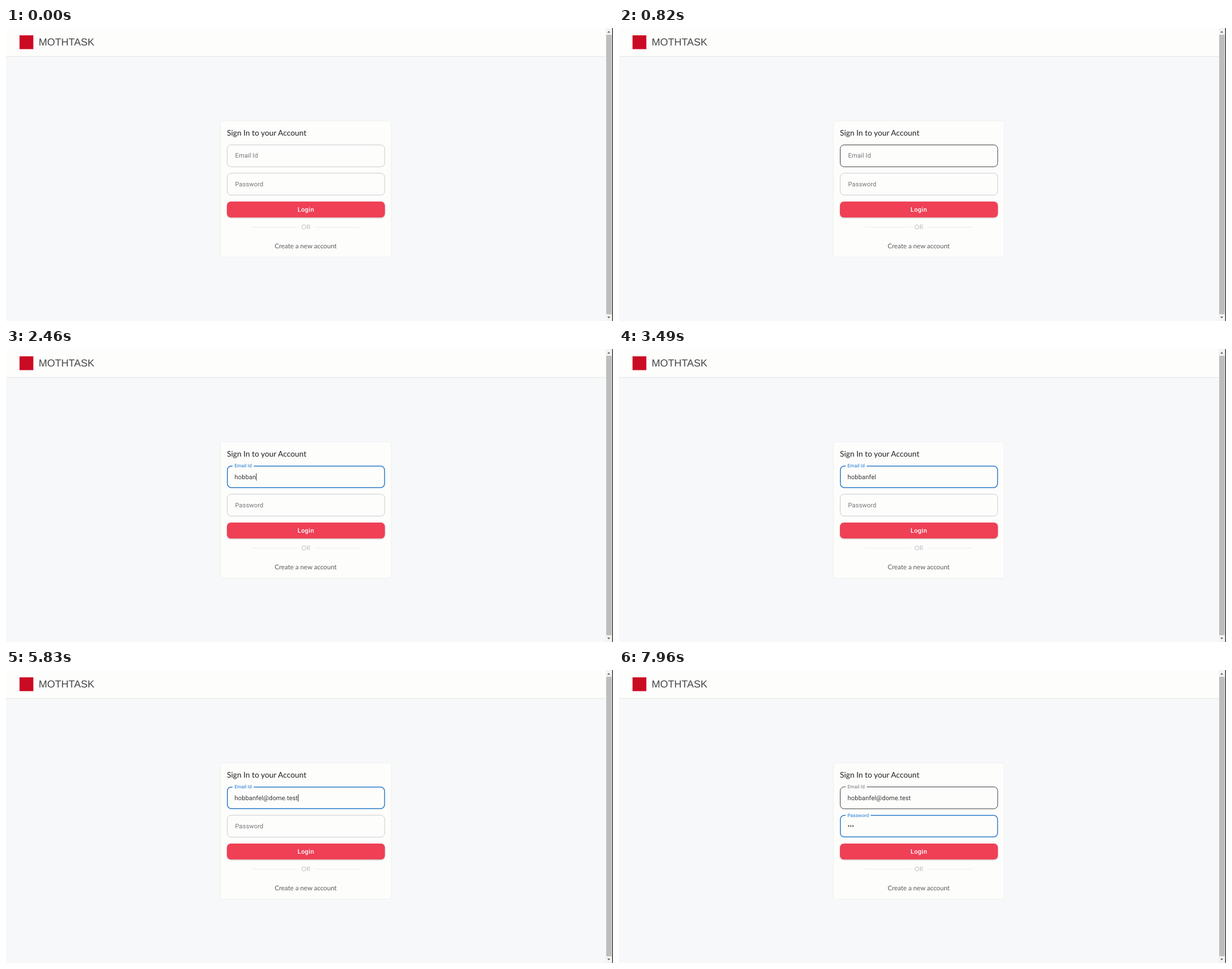
An HTML page for the animation above (7.99 s loop, 1077 by 520 pixels).

```html
<!DOCTYPE html>
<html lang="en">
<head>
<meta charset="utf-8">
<title>Sign in</title>
<style>
  html, body { margin: 0; width: 100%; height: 100%; overflow: hidden; background: #f6f8f9; }
  svg { display: block; width: 1077px; height: 520px; text-rendering: geometricPrecision; }
  .brand { font: 18px "Liberation Sans", Arial, sans-serif; fill: #444448; }
  .soft { font-family: Lato, sans-serif; }
  .ui { font: 11.2px Roboto, sans-serif; letter-spacing: .00938em; }
  .button { font-weight: 500; letter-spacing: .02857em; fill: #fff; }
  .mid { text-anchor: middle; }
  .value { fill: #38383a; }
  .edge { fill: none; }
  .login { filter: drop-shadow(0 1px 1px rgba(0, 0, 0, .24)); }
</style>
</head>
<body>
<svg viewBox="0 0 1077 520">
  <rect width="1077" height="520" fill="#f6f8f9"/>
  <rect width="1064" height="50" fill="#fdfdfc"/>
  <rect y="50" width="1064" height="1" fill="#e3e5e3"/>
  <rect x="24" y="13" width="24.5" height="24.5" fill="#cb0a24"/>
  <text class="brand" x="58" y="31.4">MOTHTASK</text>

  <g id="scrollbar">
    <rect x="1064" width="12" height="520" fill="#f3f3f2"/>
    <rect x="1065" y="12" width="9.5" height="496" fill="#bdbdbd"/>
    <path d="M1066.8 8.2h5.4l-2.7-3zM1066.8 512.2h5.4l-2.7 3z" fill="#606060"/>
    <rect x="1075.6" width="1.4" height="520" fill="#303030"/>
  </g>

  <rect x="380.5" y="165" width="303" height="241.7" rx="3" fill="#fdfdfc" stroke="#eef0f1"/>
  <text class="soft" x="392" y="191.3" font-size="13.85" fill="#222224">Sign In to your Account</text>

  <g id="fields"></g>

  <rect class="login" x="392" y="308" width="280.3" height="28.3" rx="7" fill="#ef4056"/>
  <text class="ui button mid" x="532" y="325.8">Login</text>
  <path d="M437 353.5h80M547 353.5h80" stroke="#ececf3"/>
  <text class="soft mid" x="532" y="357.4" font-size="11.2" fill="#c0c0c3">OR</text>
  <text class="soft mid" x="531.7" y="391" font-size="11.6" fill="#5a5a5d">Create a new account</text>
</svg>

<script>
  const LOOP = 7990;
  const HOVER = 600, FOCUS = 1100, TAB = 6300;
  const ADDRESS = "hobbanfel@dome.test";
  const ADDRESS_KEYS = [1500, 1690, 1850, 2040, 2200, 2390, 2560, 2700, 2850, 3900,
                        4130, 4330, 4510, 4700, 4890, 5130, 5330, 5490, 5660];
  const SECRET_KEYS = [7000, 7200, 7400];
  const BLUE = [25, 118, 210], GREY = [118, 118, 120];

  const clamp = v => Math.min(1, Math.max(0, v));
  const easeOut = p => 1 - (1 - clamp(p)) ** 3;
  const mix = (a, b, p) => a + (b - a) * p;
  const mixColor = (a, b, p) => `rgb(${a.map((v, i) => Math.round(mix(v, b[i], p)))})`;

  function add(parent, tag, attrs) {
    const el = document.createElementNS("http://www.w3.org/2000/svg", tag);
    for (const key in attrs) el.setAttribute(key, attrs[key]);
    return parent.appendChild(el);
  }

  // Outlined text field whose label floats into a notch in the border.
  function makeField(dy, name, notch, text, keys, start, end) {
    const g = add(document.getElementById("fields"), "g", { transform: `translate(0 ${dy})` });
    const edge = add(g, "path", { class: "edge" });
    const label = add(g, "text", { class: "ui" });
    label.textContent = name;
    const value = add(g, "text", { class: "ui value", x: 405.6, y: 230.8 });
    const caret = add(g, "rect", { y: 220.6, width: .9, height: 13, fill: "#222" });
    return { edge, label, value, caret, notch, text, keys, start, end };
  }

  function outline(gap, inset) {
    const l = 392.5 + inset, r = 671.9 - inset, t = 207.5 + inset, b = 246.3 - inset, c = 7;
    return `M${402 + gap} ${t}H${r - c}a${c} ${c} 0 0 1 ${c} ${c}V${b - c}a${c} ${c} 0 0 1 ${-c} ${c}` +
      `H${l + c}a${c} ${c} 0 0 1 ${-c} ${-c}V${t + c}a${c} ${c} 0 0 1 ${c} ${-c}H402`;
  }

  function drawField(f, t, hovered) {
    const focused = t >= f.start && t < f.end;
    const float = easeOut((t - f.start) / 200);
    const gap = f.notch * easeOut((t - f.start - 50) / 100);
    const tint = float * (1 - easeOut((t - f.end) / 200));
    const typed = f.keys.filter(k => k <= t);

    f.edge.setAttribute("d", outline(gap, focused ? .25 : 0));
    f.edge.setAttribute("stroke", focused ? "#2b7bc8" : hovered ? "#3c3c40" : "#cbcbcd");
    f.edge.setAttribute("stroke-width", focused ? 1.5 : 1);

    f.label.setAttribute("transform",
      `translate(${mix(406.5, 405.5, float)} ${mix(230.4, 210.3, float)}) scale(${mix(1, .75, float)})`);
    f.label.setAttribute("fill", mixColor(GREY, BLUE, tint));

    const shown = f.text.slice(0, typed.length);
    if (f.value.textContent !== shown) f.value.textContent = shown;

    const since = t - (typed.length ? typed[typed.length - 1] : f.start);
    const lit = focused && since % 1000 < 500;
    f.caret.setAttribute("visibility", lit ? "visible" : "hidden");
    f.caret.setAttribute("x", 405.7 + (shown ? f.value.getComputedTextLength() : 0));
  }

  const email = makeField(0, "Email Id", 37.5, ADDRESS, ADDRESS_KEYS, FOCUS, TAB);
  const secret = makeField(50.2, "Password", 44.5, "•••", SECRET_KEYS, TAB, Infinity);

  const origin = performance.now();
  function draw() {
    const t = Math.max(0, performance.now() - origin) % LOOP;
    drawField(email, t, t >= HOVER);
    drawField(secret, t, false);
    requestAnimationFrame(draw);
  }
  draw();
</script>
</body>
</html>
```
